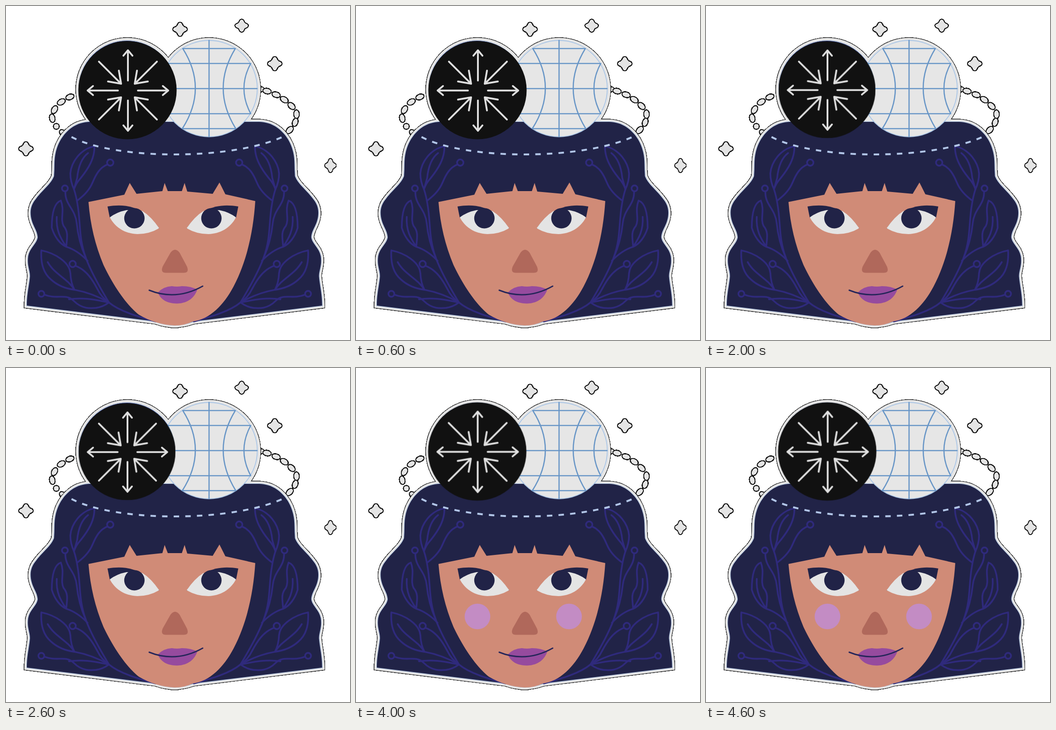
Recreate the animation shown at these times as an HTML page. Size 759x738 px, loop 5 s.

```html
<!DOCTYPE html>
<html lang="en">
<head>
<meta charset="utf-8">
<title>Portrait with two buns</title>
<style>
  html, body { margin: 0; width: 100%; height: 100%; overflow: hidden; background: #fff; }
  svg { display: block; width: 100vw; height: 100vh; }

  #figure { animation: flip 5s step-end infinite; }
  #ball { animation: ball 5s step-end infinite; }
  #cheeks { animation: blush 5s step-end infinite; }

  @keyframes flip {
    0%, 40%, 80%, 100% { transform: none; }
    20%, 60% { transform: translate(759px, 0) scale(-1, 1); }
  }
  @keyframes ball {
    0%, 100% { transform: translate(268px, 186px) scale(1); }
    20% { transform: translate(494.5px, 184px) scale(.977); }
    40% { transform: translate(267px, 185px) scale(.986); }
    60% { transform: translate(494.5px, 184.3px) scale(.986); }
    80% { transform: translate(267.5px, 184.5px) scale(1); }
  }
  @keyframes blush {
    0%, 100% { visibility: hidden; }
    60% { visibility: visible; }
  }

  .edge { stroke: #1c1c1c; stroke-width: 13.5; fill: #1c1c1c; shape-rendering: crispEdges; }
  .band { stroke: #e6e6e6; stroke-width: 11; fill: #e6e6e6; }
  .rim { stroke: #b4c8e4; stroke-width: 2.4; }
  .navy { fill: #212347; }
  .charm { fill: #e4e4e4; stroke: #1c1c1c; stroke-width: 2.4; shape-rendering: crispEdges; }
  .line { fill: none; stroke-linecap: round; stroke-linejoin: round; }
  .vine { stroke: #2f2a7c; stroke-width: 3.8; }
  .grid { stroke: #6795c6; stroke-width: 2.6; }
  .arrow { stroke: #dfdfdf; stroke-width: 4; }
</style>
</head>
<body>
<svg viewBox="0 0 759 738" preserveAspectRatio="none">
  <defs>
    <path id="star" d="M0-15C3-15 5-13 6-10C7-7 8-6 11-5C14-4 16-2 16 0C16 3 14 5 11 6C8 7 7 8 6 11C5 14 3 16 0 16C-3 16-5 14-6 11C-7 8-8 7-11 6C-14 5-16 3-16 0C-16-2-14-4-11-5C-8-6-7-7-6-10C-5-13-3-15 0-15Z"/>
    <ellipse id="bead" rx="9.5" ry="6.2"/>
    <path id="halfHair" d="M374 256H185C160 257 143 267 128 285C113 304 107 326 107 350Q107 362 106 376C99 394 82 405 67 425C56 438 53 450 55 465C58 486 69 494 70 511C68 526 53 533 49 553C46 574 53 583 53 597C51 620 46 635 46 662L330 697Q352 705 374 705Z"/>
    <g id="hair">
      <use href="#halfHair"/>
      <use href="#halfHair" transform="matrix(-1 0 0 1 743.5 0)"/>
    </g>
    <g id="silhouette">
      <use href="#hair"/>
      <circle cx="268" cy="184" r="108.2"/>
      <circle cx="448" cy="184" r="108.2"/>
    </g>
    <g id="vines" class="line vine">
      <path d="M330 697C298 688 252 676 227 655C212 630 186 584 176 556C160 512 165 480 158 440Q155 420 150 405"/>
      <path d="M195 310C164 316 144 345 142 370Q142 388 150 405M195 310C196 337 181 360 165 380Q154 392 150 405M181 325C164 338 159 360 157 380L150 405"/>
      <path d="M224 350C207 357 199 371 191 390Q182 412 157 430"/>
      <circle cx="230" cy="346" r="7"/>
      <path d="M131 410C130 440 153 448 156 480Q160 520 176 556"/>
      <circle cx="130" cy="403" r="6.5"/>
      <path d="M121 430C103 436 101 470 101 490C107 510 119 526 133 532M121 430C130 452 119 470 127 486C139 500 134 514 133 532M112 466C110 498 122 515 133 532Q158 540 180 563"/>
      <path d="M78 540C108 546 140 566 142 590Q143 612 151 627M78 540C76 570 84 592 100 605Q120 623 151 627M92 566C108 594 135 601 151 627Q190 634 227 655"/>
      <path d="M153 574C178 583 192 607 202 626Q210 643 227 655"/>
      <circle cx="147" cy="570" r="7"/>
      <path d="M85 638C113 649 133 634 150 652C168 670 187 668 199 667Q214 665 227 655C203 651 177 643 139 648"/>
      <circle cx="78" cy="636" r="6.5"/>
    </g>
    <g id="eye">
      <path class="navy" d="M224 443C266 436 306 444 338 492L229 468Z"/>
      <path fill="#e4e4e4" d="M229 467Q245 455 266 451L301 453Q320 465 338 491Q316 504 290 504C264 503 242 491 229 467Z"/>
      <circle class="navy" cx="283.3" cy="469" r="22.5"/>
    </g>
    <path id="out" class="line arrow" d="M0-22V-88M-10-77L0-89L10-77"/>
    <path id="in" class="line arrow" d="M-64-64L-15-15M-44-20L-15-15L-20-44"/>
    <g id="pair"><use href="#out"/><use href="#in"/></g>
  </defs>

  <g id="figure">
    <g class="charm">
      <use href="#star" x="384" y="51"/>
      <use href="#star" transform="translate(520 43) scale(.92)"/>
      <use href="#star" x="593" y="127"/>
      <use href="#star" x="44" y="315"/>
      <use href="#star" transform="translate(716 352) scale(.8 1)"/>

      <use href="#bead" transform="translate(141 201) rotate(-20)"/>
      <use href="#bead" transform="translate(122 212) rotate(-28)"/>
      <use href="#bead" transform="translate(107 229) rotate(-60)"/>
      <use href="#bead" transform="translate(102 248) rotate(78)"/>
      <circle cx="111" cy="266" r="6.5"/>
      <use href="#bead" transform="translate(126 281) rotate(40)"/>

      <use href="#bead" transform="translate(564 184) scale(.6 .9)"/>
      <use href="#bead" transform="translate(576 188) rotate(12)"/>
      <use href="#bead" transform="translate(596 196) rotate(18)"/>
      <use href="#bead" transform="translate(614 207) rotate(32)"/>
      <use href="#bead" transform="translate(630 221) rotate(42)"/>
      <use href="#bead" transform="translate(641 239) rotate(88)"/>
      <use href="#bead" transform="translate(638 257) rotate(110)"/>
      <use href="#bead" transform="translate(626 274) rotate(-45)"/>
    </g>

    <use href="#silhouette" class="edge"/>
    <use href="#silhouette" class="band"/>
    <use href="#hair" class="rim"/>
    <use href="#hair" class="navy"/>
    <circle class="navy" cx="267" cy="183" r="106.5" stroke="#8ea6d4" stroke-width="1.2"/>

    <use href="#vines"/>
    <use href="#vines" transform="matrix(-1 0 0 1 744.5 0)"/>

    <circle cx="448" cy="182.5" r="106.5" fill="#e6e6e6" stroke="#a9c5e6" stroke-width="1.8"/>
    <path class="line grid" d="M448 76V289M390 94H506M357 127H540M342 182.5H554M357 238H540M389 271H507M390 94Q446 182 389 271M506 94Q452 182 507 271M540 127Q510 182 540 238M357 127Q387 182 357 238"/>

    <path fill="none" stroke="#b2c6e8" stroke-width="4.2" stroke-dasharray="12 13.6" stroke-dashoffset="-3" d="M142 288C240 342 510 342 621 284"/>

    <path fill="#d08b77" d="M182 433L261 417L273 391L288 415L345 409L350 391L357 409H388L394 391L400 410L456 415L471 390L484 416L550 431C546 495 532 563 502 620C480 661 450 692 412 697Q394 706 372 706C347 705 318 697 293 682C262 657 234 612 215 572C197 529 186 484 182 433Z"/>

    <use href="#eye"/>
    <use href="#eye" transform="matrix(-1 0 0 1 736.5 0)"/>

    <g id="cheeks" fill="#c38cc4">
      <circle cx="268" cy="549" r="28.3"/>
      <circle cx="470" cy="549" r="28.3"/>
    </g>

    <path fill="#b0685b" d="M363 545Q373 532 383 545L399 575Q405 589 393 589.5H352Q340 589 346 575Z"/>
    <path fill="#964b9e" d="M335 633Q347 620 366 619Q377 621 388 619Q409 619 422 627C414 649 396 657 377 657.5C356 657 342 650 335 633Z"/>
    <path class="line" stroke="#26265a" stroke-width="3" d="M316 628Q375 652 434 619"/>
  </g>

  <g id="ball">
    <circle r="108.5" fill="#111"/>
    <g transform="translate(1 .8)">
      <use href="#pair"/>
      <use href="#pair" transform="rotate(90)"/>
      <use href="#pair" transform="rotate(180)"/>
      <use href="#pair" transform="rotate(270)"/>
    </g>
  </g>
</svg>
</body>
</html>
```
